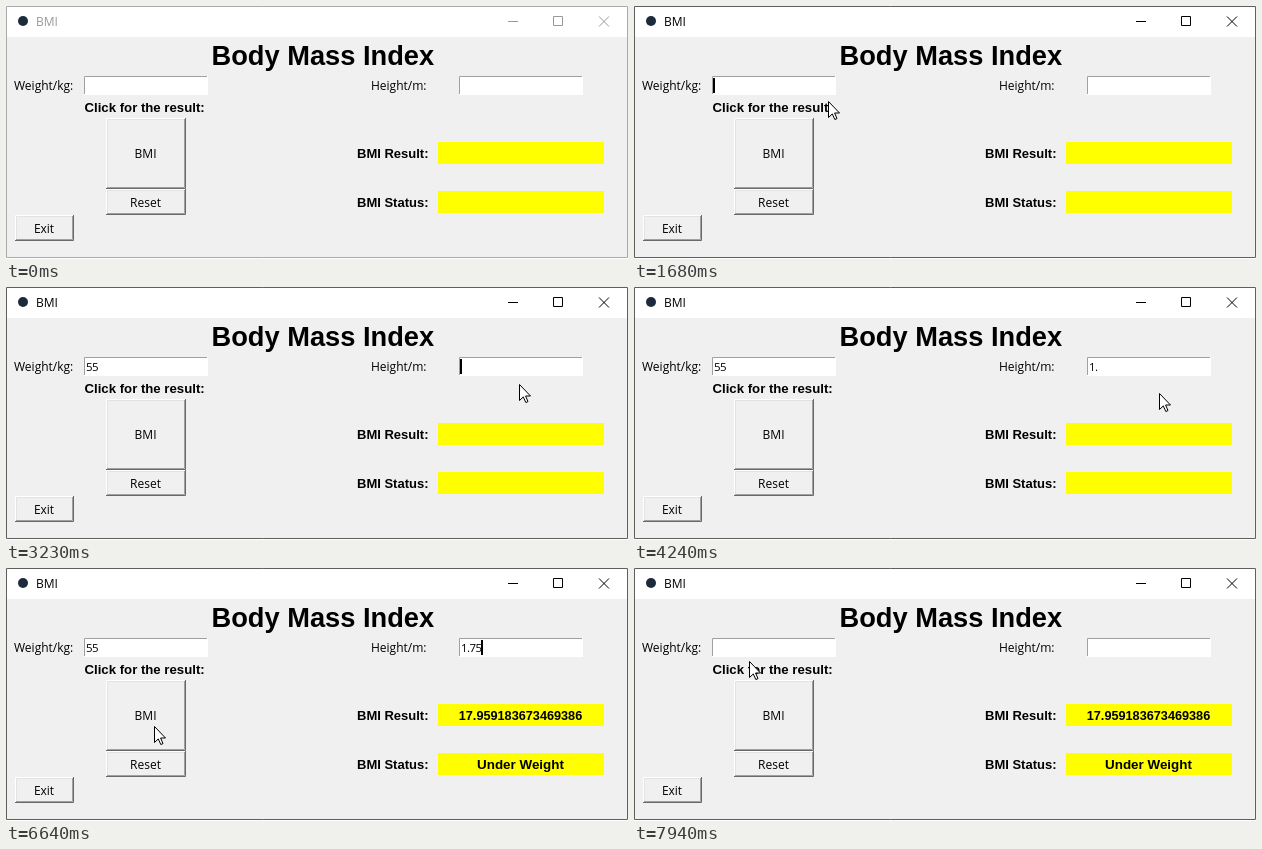
An HTML page for the animation above (8 s loop, 622 by 253 pixels).

```html
<!DOCTYPE html>
<html lang="en">
<head>
<meta charset="utf-8">
<title>BMI</title>
<style>
html, body { margin: 0; width: 100%; height: 100%; overflow: hidden; background: #fff; }
svg { display: block; }
text { font: 12px "Open Sans", "Noto Sans", sans-serif; white-space: pre; }
.b { font: bold 13px "Liberation Sans", Arial, sans-serif; }
.mid { text-anchor: middle; }
.entry { font-size: 11.5px; letter-spacing: -.58px; }
</style>
</head>
<body>
<svg id="stage" width="622" height="253" viewBox="0 0 622 253"></svg>
<script>
const stage = document.getElementById('stage');

function add(tag, attrs, text) {
  const el = document.createElementNS('http://www.w3.org/2000/svg', tag);
  for (const key in attrs) el.setAttribute(key, attrs[key]);
  if (text) el.textContent = text;
  stage.append(el);
  return el;
}
const set = (el, key, value) => el.setAttribute(key, value);
const show = (el, on) => set(el, 'visibility', on ? 'visible' : 'hidden');
const rect = (x, y, width, height, fill) => add('rect', { x, y, width, height, fill });
const path = (d, stroke, fill = 'none') => add('path', { d, stroke, fill });
const label = (x, y, text, cls = '', size) =>
  add('text', { x, y, class: cls, style: size ? `font-size:${size}px` : '' }, text);

function button(x, y, w, h, text) {
  rect(x, y, w, h, '#f0f0f0');
  const edge = (i, lit) => path(lit
    ? `M${x + i + .5} ${y + h - i - 1}V${y + i + .5}H${x + w - i - 1}`
    : `M${x + i} ${y + h - i - .5}H${x + w - i - .5}V${y + i}`);
  const edges = [edge(0, true), edge(1, true), edge(0, false), edge(1, false)];
  const caption = label(x + w / 2 - .5, y + h / 2 + 4.5, text, 'mid');
  const up = ['#fff', '#e3e3e3', '#696969', '#a0a0a0'];
  const down = ['#a0a0a0', '#696969', '#fff', '#e3e3e3'];
  return pressed => {
    edges.forEach((e, i) => set(e, 'stroke', (pressed ? down : up)[i]));
    set(caption, 'transform', pressed ? 'translate(1 1)' : '');
  };
}

function entry(x) {
  rect(x, 70, 124, 19, '#fff');
  path(`M${x + .5} 88V70.5H${x + 123}`, '#a0a0a0');
  const value = label(x + 2, 84, '', 'entry');
  const caret = rect(x + 1, 72, 2, 15, '#000');
  return (text, caretOn) => {
    value.textContent = text;
    set(caret, 'x', x + 1 + text.length * 6 - (text.includes('.') ? 3 : 0));
    show(caret, caretOn);
  };
}

// Window
rect(0, 0, 622, 252, '#fff');
rect(1, 31, 620, 220, '#f0f0f0');
const frame = path('M.5 .5H621.5V251.5H.5Z');
add('circle', { cx: 17, cy: 15, r: 5, fill: '#1c2a3c' });
const caption = label(30, 20, 'BMI');
const controls = path('M502 15.5h10M547.5 10.5h9v9h-9ZM593 10.5l10 10m0 -10l-10 10');

// Form
label(205.5, 59, 'Body Mass Index', 'b', 27.25);
label(8, 84, 'Weight/kg:');
label(365, 84, 'Height/m:');
label(78.5, 106, 'Click for the result:', 'b', 13.2);
label(351, 152, 'BMI Result:', 'b');
label(351, 201, 'BMI Status:', 'b');
rect(432, 136, 166, 22, '#ff0');
rect(432, 185, 166, 22, '#ff0');
const results = [
  label(514.5, 152, (55 / 1.75 ** 2).toFixed(15), 'b mid', 12.7),
  label(514.5, 201, 'Under Weight', 'b mid', 13.4)
];
const weight = entry(78), height = entry(453);
const bmi = button(100, 112, 80, 71, 'BMI');
const reset = button(100, 183, 80, 26, 'Reset');
button(9, 209, 59, 26, 'Exit')(false);

// Pointers
const arrow = path('M.5 .5V16.5L4.3 12.9L6.8 18.5L9 17.6L6.6 12H11.5Z', '#000', '#fff');
const beam = path('M-3 -7.5h3m1 0h3M-3 7.5h3m1 0h3M.5 -7v14', '#000');

const TICK = 77.3, START = 130;
const ACTIVATE = 13, FOCUS_WEIGHT = 14, FOCUS_HEIGHT = 34;
const PRESS_BMI = 75, PRESS_RESET = 95;
const weightKeys = [24, 27], heightKeys = [47, 50, 57, 59];

// Each move eases to x, y; bow is how far the path sags
const moves = [
  { from: 0, to: 11, x: 169, y: 85 },
  { from: 17, to: 34, x: 477, y: 70, bow: 36 },
  { from: 36, to: 42, x: 525, y: 106 },
  { from: 64, to: 73, x: 148, y: 158, bow: 20 },
  { from: 84, to: 93, x: 154, y: 196 },
  { from: 96, to: 101, x: 115, y: 93 }
];

function pointer(k) {
  let x = 476, y = 240;
  for (const m of moves) {
    const p = Math.min(1, Math.max(0, (k - m.from) / (m.to - m.from)));
    const s = p * p * (3 - 2 * p);
    x += (m.x - x) * s;
    y += (m.y - y) * s + 4 * s * (1 - s) * (m.bow || 0);
  }
  return [Math.round(x), Math.round(y)];
}

function draw(ms) {
  const k = Math.floor((ms - START) / TICK);
  const active = k >= ACTIVATE, cleared = k > PRESS_RESET;
  const typed = (text, keys) => cleared ? '' : text.slice(0, keys.filter(t => t <= k).length);
  const blink = focus => k >= focus && (k - focus) % 11.5 < 7.5;

  set(frame, 'stroke', active ? '#5f5f5f' : '#aaa');
  set(caption, 'fill', active ? '#000' : '#999');
  set(controls, 'stroke', active ? '#000' : '#999');
  weight(typed('55', weightKeys), blink(FOCUS_WEIGHT) && k < FOCUS_HEIGHT);
  height(typed('1.75', heightKeys), blink(FOCUS_HEIGHT));
  bmi(k === PRESS_BMI);
  reset(k === PRESS_RESET);
  results.forEach(r => show(r, k > PRESS_BMI));

  const [x, y] = pointer(k);
  const inEntry = y >= 70 && y < 90 && (x >= 78 && x < 202 || x >= 453 && x < 577);
  show(arrow, k >= 0 && !inEntry);
  show(beam, k >= 0 && inEntry);
  for (const p of [arrow, beam]) set(p, 'transform', `translate(${x} ${y})`);
}

function loop() {
  draw(performance.now() % 8000);
  requestAnimationFrame(loop);
}
loop();
</script>
</body>
</html>
```
